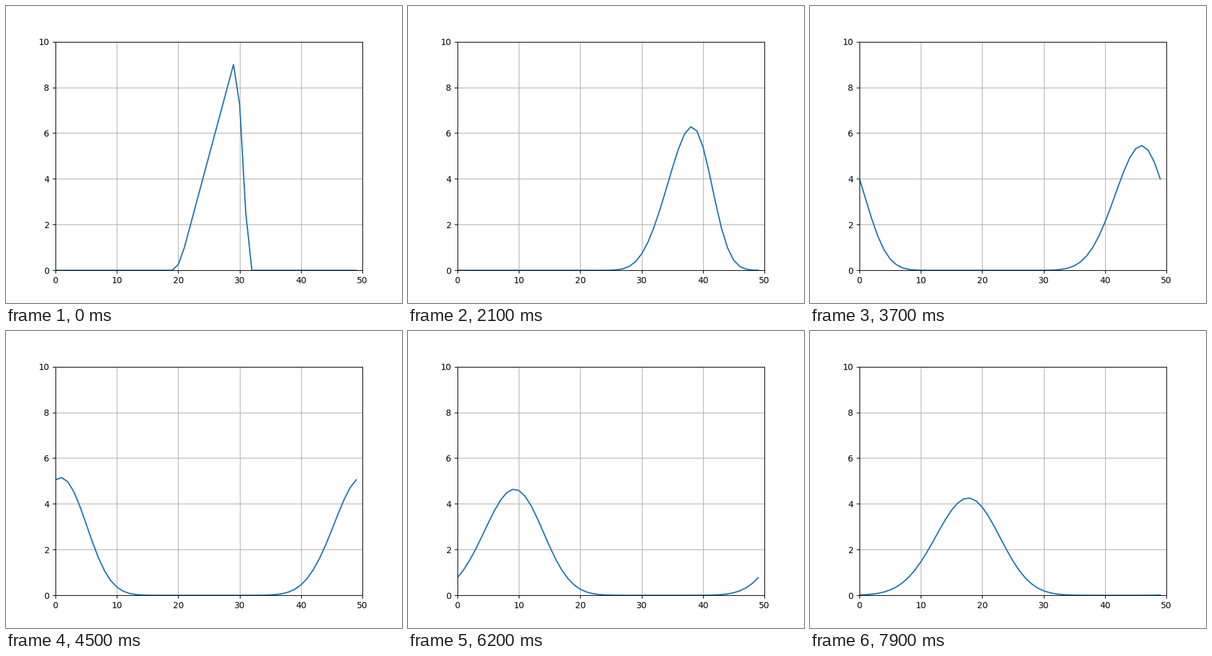
A matplotlib script that plays this animation: 640x480 px, repeating every 8000 ms.

```python
import numpy as np
import matplotlib.pyplot as plt
from matplotlib.animation import FuncAnimation

N = 50          # grid points
FRAMES = 80
COURANT = 0.5   # cells travelled per step
WARMUP = 2      # steps taken before the first picture


def step(u):
    """One upwind advection step; both ends share the same value."""
    new = u.copy()
    new[1:] = u[1:] - COURANT * (u[1:] - u[:-1])
    new[0] = new[-1]
    return new


def solve():
    u = np.zeros(N)
    u[20:30] = np.arange(1, 11)
    states = [u]
    for _ in range(WARMUP + FRAMES - 1):
        states.append(step(states[-1]))
    return states[WARMUP:]


states = solve()
x = np.arange(N)

fig, ax = plt.subplots(figsize=(6.4, 4.8), dpi=100)
ax.set_xlim(0, 50)
ax.set_ylim(0, 10)
ax.grid(True)
line, = ax.plot(x, states[0], color="tab:blue", lw=1.5)


def update(i):
    line.set_ydata(states[i])
    return line,


anim = FuncAnimation(fig, update, frames=FRAMES, interval=100,
                     repeat=True, repeat_delay=0, blit=False)
plt.show()
```
